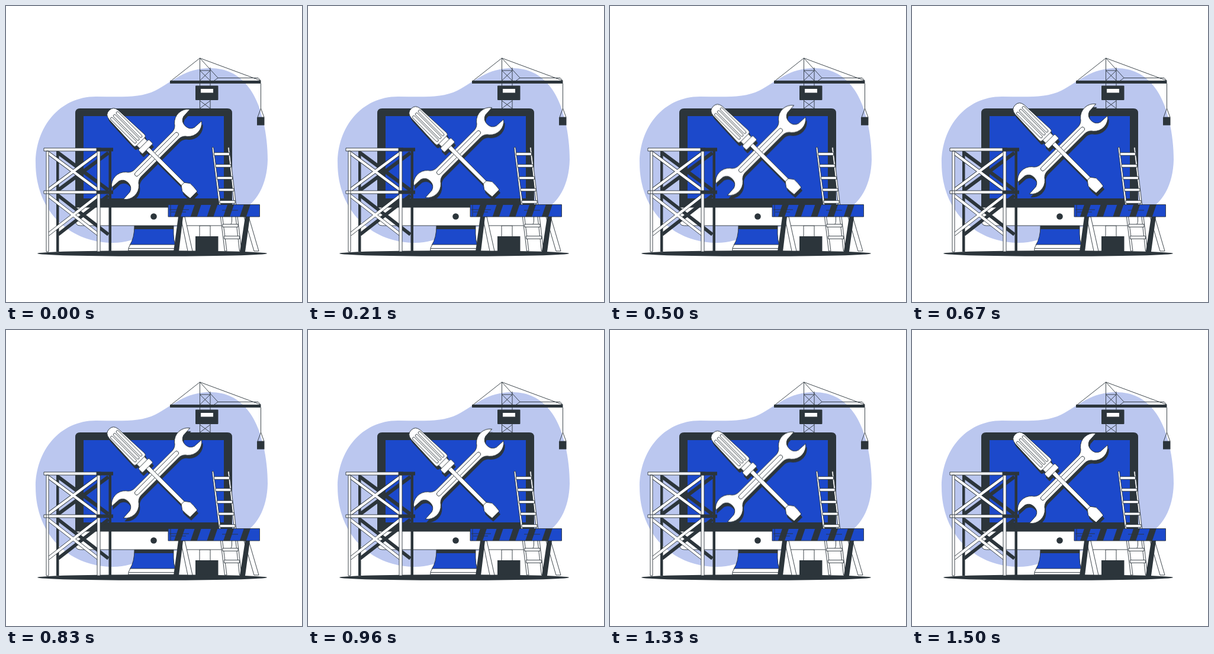
These frames come from a looping animation (500x500 px, 1540 ms). An HTML page without scripts:

```html
<!DOCTYPE html>
<html lang="en">
<head>
<meta charset="utf-8">
<title>Under construction</title>
<style>
  html, body { margin: 0; width: 100%; height: 100%; overflow: hidden; background: #fff; }
  svg { display: block; width: 100%; height: 100%; --dark: #2c353b; --blue: #1c49cb; --tint: #bbc7ef; }
  .dark { fill: var(--dark); }
  .blue { fill: var(--blue); }
  .tint { fill: var(--tint); }
  .line { fill: none; stroke: var(--dark); stroke-width: .9; stroke-linejoin: round; }
  .paper { fill: #fff; stroke: var(--dark); stroke-width: .9; stroke-linejoin: round; }
  .beam { fill: none; stroke: var(--dark); stroke-width: 6; }
  .beam-core { fill: none; stroke: #fff; stroke-width: 4.4; }
  .floating { animation: float 1540ms linear infinite; }
  @keyframes float {
    0%, 97.4%, 100% { transform: translateY(0); }
    48.7% { transform: translateY(-10px); }
  }
</style>
</head>
<body>
<svg viewBox="0 0 500 500">
  <defs>
    <g id="wrench" transform="translate(254.5 250.5) rotate(-45)">
      <path d="M46 -8Q54 -9 58 -15.5A23 23 0 0 1 93.5 -14L77 -13Q68 -10 68 0Q68 10 77 13L93.5 14A23 23 0 0 1 58 15.5Q54 9 46 8H-46Q-54 9 -58 15.5A23 23 0 0 1 -93.5 14L-77 13Q-68 10 -68 0Q-68 -10 -77 -13L-93.5 -14A23 23 0 0 1 -58 -15.5Q-54 -9 -46 -8Z"/>
    </g>
    <g id="driver" transform="translate(182 184) rotate(45)">
      <path d="M80 -3.5H166V3.5H80Z"/>
      <path d="M165 -3.5L173 -9.5Q182 -10 191 -8.5V8.5Q182 10 173 9.5L165 3.5Z"/>
      <path d="M63 -9H72V9H63Z"/>
      <rect x="71" y="-12.5" width="10" height="25" rx="1.5"/>
      <path d="M0 -11L60 -13.5Q64 -13.5 64 -10V10Q64 13.5 60 13.5L0 11Q-11 10 -11 0Q-11 -10 0 -11Z"/>
    </g>
    <path id="braces" d="M71 311L156 248M71 248L156 311M71 386L156 320M71 320L156 386"/>
    <path id="rung" d="M0 -2.3H26V2.3H0Z"/>
    <path id="stripe" class="dark" d="M291 335.500H302L295 356H284Z"/>
  </defs>

  <path class="tint" d="M50 265C50 205 90 153 152 153C190 153 226 156 252 143C283 127 302 105 345 105C400 105 424 150 434 192C440 217 442 240 442 260C441 300 425 336 388 350C340 366 285 370 240 385C215 395 200 401 175 400C105 397 50 345 50 265Z"/>

  <g id="crane">
    <path class="line" d="M327.500 173V88L278 127M327.500 88L430 126M327.500 88L358 121.500H426L430 126M358 121.500L349 128M345 173V104M327.500 109H345L327.500 126M327.500 109L345 126M327.500 160L345 173M345 160L327.500 173"/>
    <path class="dark" d="M277 126H430.500V131H277Z"/>
    <rect class="dark" x="320" y="134.500" width="38.500" height="24.500" rx="1"/>
    <path fill="#fff" d="M329 140H350V146.500H329Z"/>
    <path class="line" d="M430.500 131V173L425 188H436L430.500 173"/>
    <path class="dark" d="M424 188H436.500V201.500H424Z"/>
    <path class="paper" d="M327 371H345V390H327Z"/>
    <path class="dark" d="M320 389H358.500V415H320Z"/>
  </g>

  <ellipse class="dark" cx="247" cy="418" rx="194" ry="4.800"/>

  <g id="monitor">
    <path class="blue" d="M217 371H283V385Q283 395 286 404H209Q217 392 217 371Z"/>
    <path class="dark" d="M217 371H283V377H217Z"/>
    <path class="line" d="M217 371Q217 392 209 404M283 371V385Q283 395 286 404"/>
    <path class="paper" d="M210 403Q206 409 206.500 413H287V403Z"/>
    <path class="line" d="M207 409.500H287"/>
    <path class="paper" d="M117.500 335H381.500V363Q381.500 371 373.500 371H125.500Q117.500 371 117.500 363Z"/>
    <path class="dark" d="M117 340.500V181Q117 173 125 173H374Q382 173 382 181V340.500Z"/>
    <path class="blue" d="M131 186H368V325H131Z"/>
    <circle class="dark" cx="249.500" cy="355.500" r="5.300"/>
  </g>

  <g class="floating">
    <g class="dark" transform="translate(2 5.500)">
      <use href="#wrench"/>
      <use href="#driver"/>
    </g>
    <g class="paper">
      <use href="#wrench"/>
      <rect x="-51" y="-3.500" width="102" height="7" rx="3.500" transform="translate(254.500 250.500) rotate(-45)"/>
      <use href="#driver"/>
      <g transform="translate(182 184) rotate(45)">
        <rect id="groove" x="0" y="-2.200" width="60" height="4.400" rx="2.200"/>
        <use href="#groove" y="-6.800"/>
        <use href="#groove" y="6.800"/>
      </g>
    </g>
  </g>

  <g id="scaffold">
    <use class="beam" href="#braces" x="17"/>
    <path class="dark" d="M85 245H89.500V415H85ZM173.500 245H178V415H173.500ZM152 239.500H181V245.500H152ZM152 311.500H181V317.500H152Z"/>
    <use class="beam" href="#braces"/>
    <use class="beam-core" href="#braces"/>
    <path class="paper" d="M68 245H72V415H68ZM154 245H159V415H154ZM64 240H153V245H64ZM64 312H153V317H64Z"/>
    <path class="dark" d="M153 239.500H161V245.500H153ZM153 311.500H161V317.500H153Z"/>
  </g>

  <g id="ladder" class="paper">
    <path d="M348 239L350.500 238.500L373 414H369.500ZM374.500 239L377 238.500L398 414H394.500Z"/>
    <use href="#rung" x="351.500" y="250"/>
    <use href="#rung" x="354" y="270"/>
    <use href="#rung" x="356.500" y="290.500"/>
    <use href="#rung" x="359" y="310.500"/>
    <use href="#rung" x="361" y="331"/>
    <use href="#rung" x="366" y="371"/>
    <use href="#rung" x="368.500" y="391"/>
  </g>

  <g id="barrier">
    <path class="paper" d="M295 356H302L315 414H307ZM402 356H410L427 414H419Z"/>
    <path class="dark" d="M291 356H299L292 415H283ZM404 356H412L404 415H395Z"/>
    <path class="blue" d="M274 335.500H428.500V356H274Z"/>
    <use href="#stripe"/>
    <use href="#stripe" x="27.700"/>
    <use href="#stripe" x="55.400"/>
    <use href="#stripe" x="83.100"/>
    <use href="#stripe" x="110.800"/>
    <path class="line" d="M274 335.500H428.500V356H274ZM278 335.500V356M276 344H309M279 348H304M365 345H392"/>
  </g>
</svg>
</body>
</html>
```
